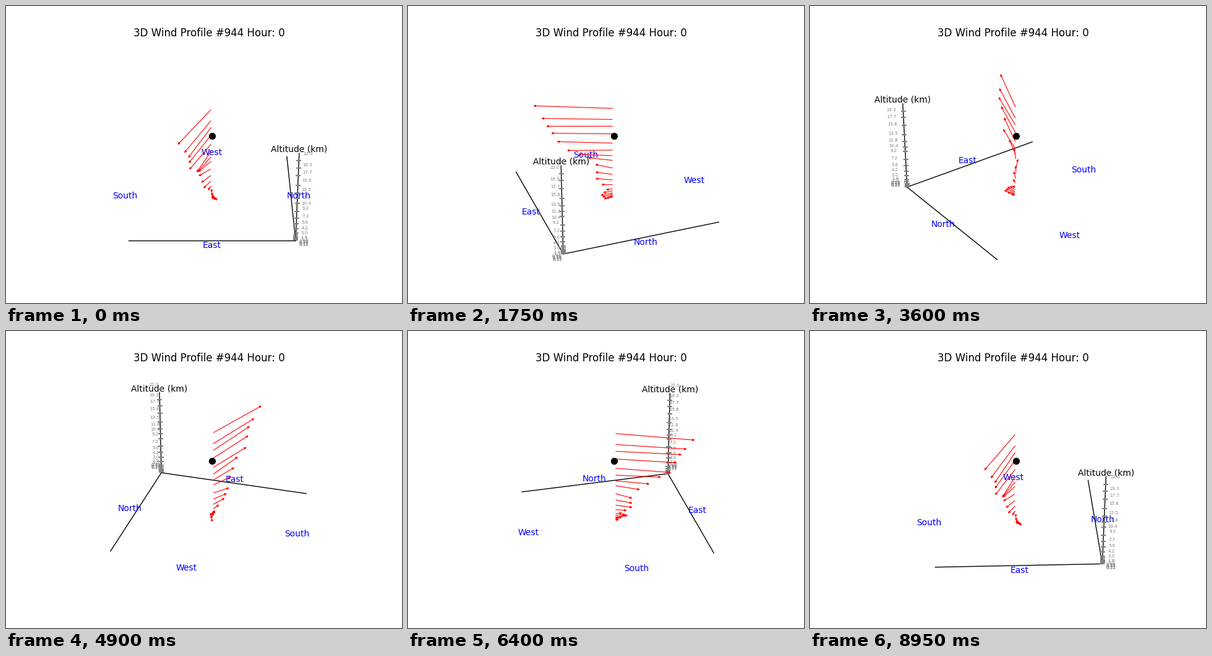
These frames come from a looping animation (640x480 px, 9000 ms). A matplotlib script:

```python
import numpy as np
import matplotlib.pyplot as plt
from matplotlib.animation import FuncAnimation
from matplotlib.patches import FancyArrowPatch

W, H, DPI = 640, 480, 100
FRAMES, STEP_MS = 180, 50

# Perspective camera: screen centre, pixels per unit, distance, elevation
CX, CY, SCALE, DIST = 333.0, 237.405, 1997.8, 10.0
COS_E, SIN_E = np.cos(np.pi / 6), np.sin(np.pi / 6)

HALF = 0.652          # half width of the floor
FLOOR = -0.4131       # height of 0 km
PER_KM = 0.0373
OUT = 1.1 * HALF      # labels sit a little outside the floor


def altitude(hpa):
    """Barometric height in km."""
    return 44.33 * (1 - (hpa / 1013.25) ** 0.19026)


PRESSURE = np.array([*range(1000, 900, -25), *range(900, 800, -50),
                     *range(800, 300, -100), *range(300, 50, -50),
                     70, 50, 27.7])
KM = altitude(PRESSURE)
Z = FLOOR + PER_KM * KM

# Wind profile: key points (km, eastward, northward), linear in between
KEYS = np.array([
    (0.1, 0.060, 0.023), (0.5, 0.120, 0.056), (1.0, 0.136, 0.006),
    (2.0, 0.080, -0.010), (4.2, 0.149, -0.080), (7.2, 0.136, -0.122),
    (9.2, 0.200, -0.122), (11.8, 0.375, -0.129), (13.5, 0.438, -0.186),
    (17.7, 0.523, -0.190), (22.0, 0.602, -0.268),
])
EAST = np.interp(KM, KEYS[:, 0], KEYS[:, 1])
NORTH = np.interp(KM, KEYS[:, 0], KEYS[:, 2])


def project(x, y, z, azim):
    """Scene point to stage pixels, y down."""
    c, s = np.cos(azim), np.sin(azim)
    side, near = y * c - x * s, x * c + y * s
    k = SCALE / (DIST - near * COS_E - z * SIN_E)
    return CX + k * side, CY - k * (z * COS_E - near * SIN_E)


fig = plt.figure(figsize=(W / DPI, H / DPI), dpi=DPI, facecolor="white")
ax = fig.add_axes([0, 0, 1, 1])
ax.set_xlim(0, W)
ax.set_ylim(H, 0)
ax.axis("off")

ax.text(328, 49.3, "3D Wind Profile #944 Hour: 0", fontsize=12,
        ha="center", va="baseline")

CORNER = (HALF, HALF, FLOOR)
EDGE_ENDS = [(-HALF, HALF, FLOOR), (HALF, -HALF, FLOOR), (HALF, HALF, 0.3728)]
edges = [ax.plot([], [], color="black", lw=1, zorder=2)[0] for _ in EDGE_ENDS]

labels = []


def add_label(text, pos, size=10, color="blue", dx=0):
    t = ax.text(0, 0, text, fontsize=size, color=color,
                ha="center", va="center", zorder=3)
    labels.append((t, pos, dx))


add_label("East", (OUT, 0, FLOOR))
add_label("West", (-OUT, 0, FLOOR))
add_label("North", (0, OUT, FLOOR))
add_label("South", (0, -OUT, FLOOR))
add_label("Altitude (km)", (HALF, HALF, Z[-1]), color="black")
for km, z in zip(KM, Z):
    text = f"{km:.1f}" if km >= 1 else f"{km:.2f}"
    add_label(text, (OUT, OUT, z), size=5, color="gray", dx=-1)

ticks = ax.scatter(Z, Z, s=36, marker="_", color="gray",
                   linewidths=1.5, zorder=4)

arrows = [ax.add_patch(FancyArrowPatch((0, 0), (1, 1), arrowstyle="-|>",
                                       mutation_scale=5, lw=0.8,
                                       color="red", zorder=5))
          for _ in KM]

ax.scatter([CX], [210.2], s=50, color="black", zorder=6)


def draw(i):
    azim = 2 * np.pi * i / FRAMES
    start = project(*CORNER, azim)
    for line, end in zip(edges, EDGE_ENDS):
        stop = project(*end, azim)
        line.set_data([start[0], stop[0]], [start[1], stop[1]])
    for text, pos, dx in labels:
        x, y = project(*pos, azim)
        text.set_position((x + dx, y))
    ticks.set_offsets(np.column_stack(project(HALF, HALF, Z, azim)))
    for arrow, u, v, z in zip(arrows, EAST, NORTH, Z):
        arrow.set_positions(project(0, 0, z, azim), project(u, v, z, azim))
    return []


anim = FuncAnimation(fig, draw, frames=FRAMES, interval=STEP_MS,
                     repeat=True, repeat_delay=0, blit=False)
plt.show()
```
